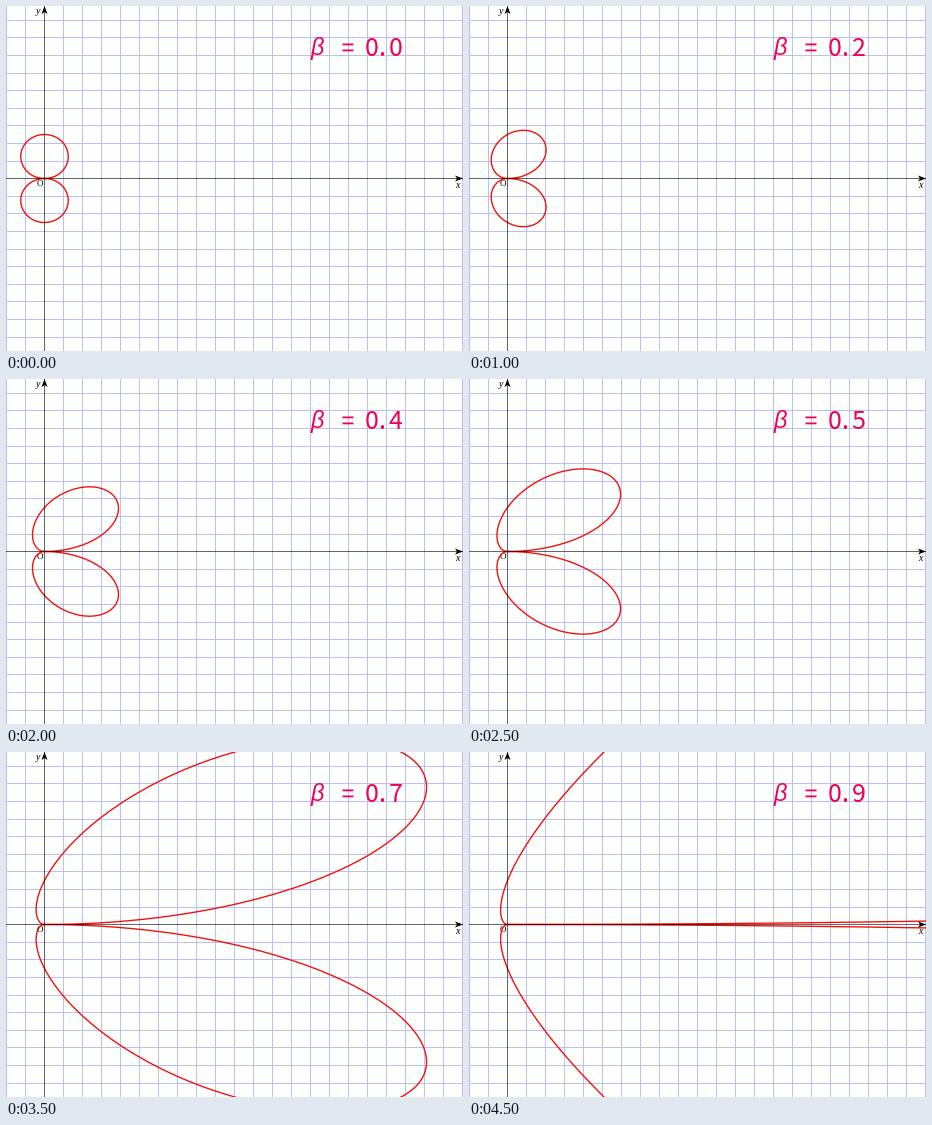
Write a matplotlib script that moves like this. It is 457x345 px and loops after 5000 ms.

```python
import numpy as np
import matplotlib.pyplot as plt
from matplotlib.animation import FuncAnimation

W, H, DPI = 457, 345, 128
PT = 72 / DPI                  # points per pixel
OX, OY = 38.5, 172.5           # origin on the stage
UX, UY = 19.0, 17.6            # grid cell
GRID, RED, PINK = "#bebef1", "#f20c0c", "#f0005a"

plt.rcParams["toolbar"] = "None"
fig = plt.figure(figsize=(W / DPI, H / DPI), dpi=DPI, facecolor="#fdfffc")
ax = fig.add_axes([0, 0, 1, 1])
ax.set_xlim(0, W)
ax.set_ylim(H, 0)
ax.axis("off")


def bar(x, y, w, h, color, alpha=1, z=1):
    ax.add_patch(plt.Rectangle((x, y), w, h, fc=color, lw=0, alpha=alpha,
                               snap=False, zorder=z))


def label(x, y, s, px, family, color="black", style="normal", z=3):
    return ax.text(x, y, s, fontsize=px * PT, family=family, color=color,
                   style=style, ha="center", va="baseline", zorder=z)


# Grid, then axes that let the curve show through
for k in range(-2, 23):
    if k:
        bar(38 + k * UX, 0, 1, H, GRID)
for k in range(-9, 10):
    if k:
        bar(0, round(172.29 + k * UY), W, 1, GRID)
bar(38, 0, 1, H, "black", 0.6, 5)
bar(0, 172, W, 1, "black", 0.6, 5)

# Arrowheads
ax.fill([W, W - 8, W - 6, W - 8], [OY, OY - 3, OY, OY + 3], "black", lw=0, zorder=5)
ax.fill([OX, OX - 3, OX, OX + 3], [0, 8, 6, 8], "black", lw=0, zorder=5)

label(32.3, 8.5, "y", 10, "Liberation Serif", style="italic")
label(451, 181.5, "x", 10, "Liberation Serif", style="italic")
label(34, 180.5, "O", 9, "Liberation Serif")

# Readout, one character per half-width cell
label(311.5, 48.5, "β", 23.5, "Liberation Sans", PINK, "italic", 6)
for y in (37.5, 43.5):
    bar(336.5, y, 11, 1.8, PINK, z=6)
label(365.5, 50, "0", 25, "Noto Sans CJK JP", PINK, z=6)
label(376, 50, ".", 25, "Noto Sans CJK JP", PINK, z=6)
digit = label(389.7, 50, "0", 25, "Noto Sans CJK JP", PINK, z=6)

# Angles are packed closely around the forward direction
u = np.linspace(-1, 1, 6001)
theta = np.pi * u * np.abs(u)
curve, = ax.plot([], [], color=RED, lw=1.35 * PT, zorder=4)


def update(i):
    beta = i / 10
    r = 2.5 * np.abs(np.sin(theta)) / (1 - beta * np.cos(theta)) ** 3
    curve.set_data(OX + UX * r * np.cos(theta), OY - UY * r * np.sin(theta))
    digit.set_text(str(i))
    return curve, digit


anim = FuncAnimation(fig, update, frames=10, interval=500, repeat=True,
                     repeat_delay=0, init_func=lambda: update(0))
plt.show()
```
